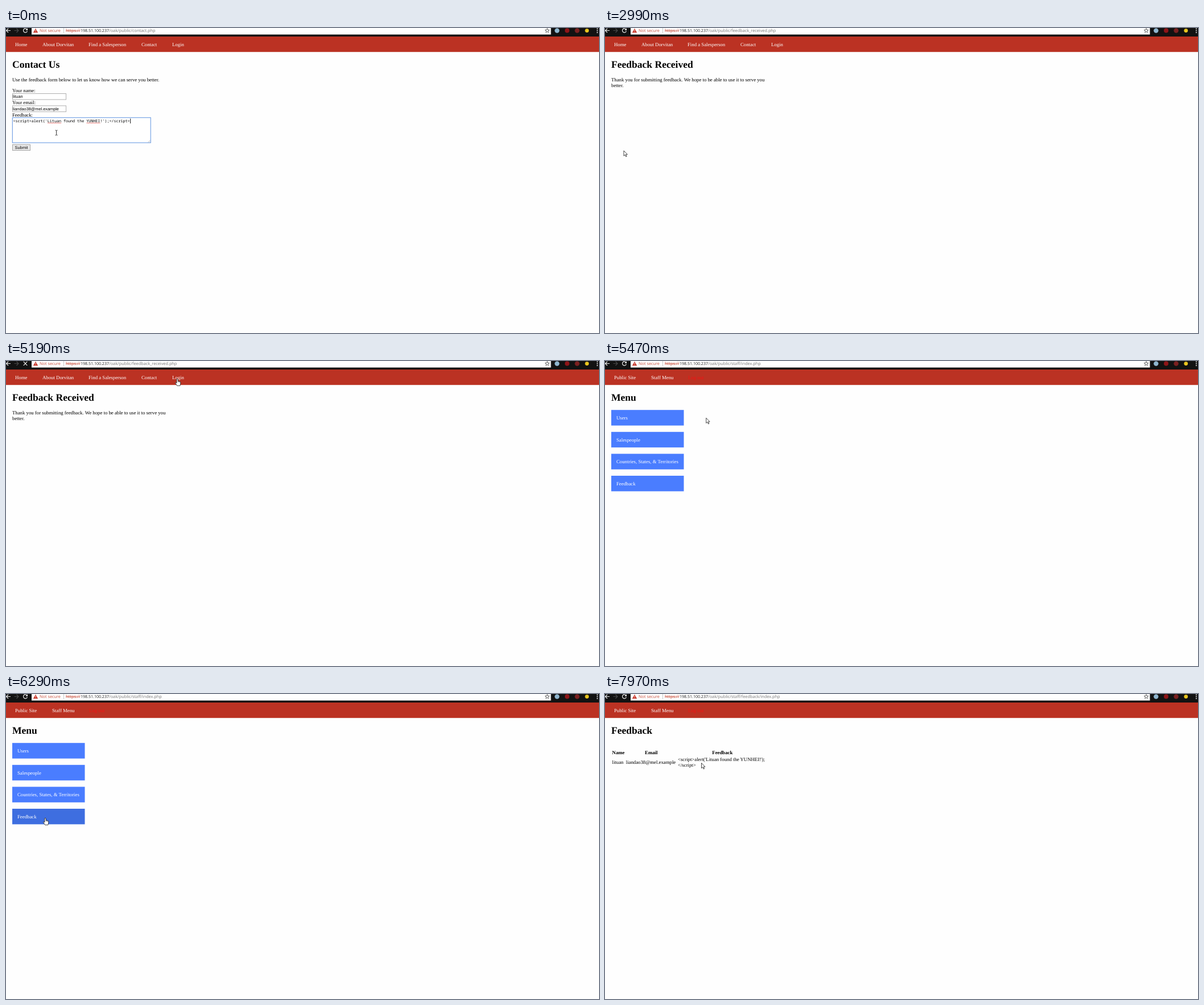
These frames come from a looping animation (1042 by 537 pixels, 8 s). An HTML page with a canvas:

```html
<!DOCTYPE html>
<html lang="en">
<head>
<meta charset="utf-8">
<title>Feedback form</title>
<style>
html, body { margin: 0; width: 100%; height: 100%; overflow: hidden; background: #fefefe; }
canvas { display: block; }
</style>
</head>
<body>
<canvas id="stage" width="1042" height="537"></canvas>
<script>
const ctx = document.getElementById('stage').getContext('2d');
const LOOP = 8000;
const SERIF = '"Liberation Serif", "Times New Roman", serif';
const SANS = '"Liberation Sans", Arial, sans-serif';
const UI = '"Open Sans", "Noto Sans", sans-serif';
const MONO = '"Noto Sans Mono", "DejaVu Sans Mono", monospace';
const BODY = '8.76px ' + SERIF, BOLD = 'bold 8.76px ' + SERIF;
const HEAD = 'bold 17.56px ' + SERIF, FIELD = '7.35px ' + SANS;

const NAME = 'lituan', EMAIL = 'liandao38@mel.example';
const OPEN = "<script>alert('Lituan found the YUNHEI!');", CLOSE = '<' + '/script>';

const ARROW = new Path2D('M0 0V9.2L2.1 7.2L3.7 10.6L5.1 10L3.6 6.7H6.4Z');
const HAND = new Path2D('M-1.1 1Q0 -.6 1.1 1V4.4L4.5 5.2Q6 5.6 5.8 7.5L4.9 12.6H-.4L-3.2 8.2Q-3.5 6.4 -2.2 7L-1.1 8Z');

// Pointer trips: start, end, number of steps, then a quadratic curve
const trips = [
  [130, 280, 2, [88.5, 184.3], [88.5, 184.7], [88.5, 185]],
  [550, 1480, 8, [88.5, 185], [64, 206], [29.5, 214]],
  [2470, 2990, 4, [29.5, 214], [31, 215], [33, 216]],
  [3270, 3700, 4, [33, 216], [130, 138], [236, 61]],
  [3980, 4920, 8, [236, 61], [-48, 60], [301, 31]],
  [5320, 5750, 4, [301, 31], [170, 90], [70, 190]],
  [5900, 6140, 3, [70, 190], [71, 240], [71, 220]],
  [6290, 6290, 1, [71, 220], [70, 219], [69, 218]],
  [7280, 7970, 6, [69, 218], [160, 79], [169.5, 121.5]]
];

const pages = [
  { from: 0, path: 'contact.php', draw: contact },
  { from: 2820, path: 'feedback_received.php', draw: received },
  { from: 5450, path: 'staff/index.php', draw: menu, staff: true },
  { from: 7010, path: 'staff/feedback/index.php', draw: feedback, staff: true }
];
const loads = [[2470, 2990], [5190, 5450], [6730, 7010]];
const publicNav = [['Home', 16], ['About Dorvitan', 64], ['Find a Salesperson', 145], ['Contact', 238], ['Login', 292]];
const staffNav = [['Public Site', 16], ['Staff Menu', 81], ['Log out', 146, '#f51313']];
const menuItems = ['Users', 'Salespeople', 'Countries, States, & Territories', 'Feedback'];
const itemY = i => 86.2 + i * 38.6;

function text(s, x, y, font = BODY, color = '#000', align = 'left') {
  ctx.font = font;
  ctx.fillStyle = color;
  ctx.textAlign = align;
  ctx.fillText(s, x, y);
}

function rect(x, y, w, h, color) {
  ctx.fillStyle = color;
  ctx.fillRect(x, y, w, h);
}

function box(x, y, w, h, fill, edge) {
  rect(x, y, w, h, fill);
  ctx.lineWidth = 1;
  ctx.strokeStyle = edge;
  ctx.strokeRect(x + .5, y + .5, w - 1, h - 1);
}

function line(d, color, width = 1) {
  ctx.strokeStyle = color;
  ctx.lineWidth = width;
  ctx.stroke(new Path2D(d));
}

function dot(x, y, r, color) {
  ctx.fillStyle = color;
  ctx.beginPath();
  ctx.arc(x, y, r, 0, 7);
  ctx.fill();
}

function pointer(t) {
  const trip = trips.filter(s => t >= s[0]).pop();
  if (!trip) return trips[0][3];
  const [t0, t1, n, a, b, c] = trip;
  const k = n > 1 ? Math.min(n, 1 + Math.floor((t - t0) * (n - 1) / (t1 - t0) + 1e-6)) : 1;
  const s = k / n, r = 1 - s;
  return a.map((v, i) => r * r * v + 2 * r * s * b[i] + s * s * c[i]);
}

function star(x, y) {
  ctx.beginPath();
  for (let i = 0; i < 10; i++) {
    const r = i % 2 ? 1.7 : 4, a = i * Math.PI / 5 - Math.PI / 2;
    ctx.lineTo(x + r * Math.cos(a), y + r * Math.sin(a));
  }
  ctx.closePath();
  ctx.strokeStyle = '#444';
  ctx.lineWidth = .8;
  ctx.stroke();
}

function toolbar(path, loading) {
  rect(0, 0, 1042, 15, '#121212');
  rect(45, 0, 912.5, 11.5, '#fefefe');
  line('M8 4.5H.8M4 1L.5 4.5L4 8', '#eee', 1.2);
  line('M14.5 4.5H21.5M18.5 1L22 4.5L18.5 8', '#484848', 1.2);
  if (loading) {
    line('M30.8 1.2L37.2 7.8M37.2 1.2L30.8 7.8', '#eee', 1.2);
  } else {
    line('M37 2.6A3.5 3.5 0 1 0 37.4 5.4', '#eee', 1.2);
    ctx.fillStyle = '#eee';
    ctx.fill(new Path2D('M38 .4V4H34.4Z'));
  }
  ctx.fillStyle = '#c8372b';
  ctx.fill(new Path2D('M52 .8L56.2 8.2H47.8Z'));
  line('M52 3V5.6M52 6.4V7.2', '#fff', .8);
  text('Not secure', 59, 7.3, '7.32px ' + UI, '#c9513f');
  rect(101, 0, .8, 9.5, '#bbb');
  text('https://', 105, 7.3, '7.5px ' + UI, '#c9513f');
  line('M105 4.9H130.5', '#c9513f', .7);
  text('198.51.100.237', 131, 7.3, '7.05px ' + UI, '#222');
  text('/oak/public/' + path, 181, 7.3, '7.32px ' + UI, '#777');
  star(951, 4.7);
  dot(968.3, 4.6, 4.2, '#8fb6cf');
  dot(986, 4.6, 4, '#8d1518');
  dot(1003.6, 4.6, 4.2, '#7b2020');
  dot(1020.8, 4.6, 3.4, '#e9c51f');
  for (const y of [1.6, 4.8, 8]) dot(1039, y, 1, '#eee');
}

function navbar(items) {
  rect(0, 15, 1042, 27.2, '#bb3223');
  for (const [label, x, color] of items) text(label, x, 32, BODY, color || '#fff');
}

function squiggle(x0, x1, y) {
  ctx.beginPath();
  for (let x = x0; x <= x1; x += .5) ctx.lineTo(x, y + .45 * Math.sin(x * 2.6));
  ctx.strokeStyle = '#e0403a';
  ctx.lineWidth = .8;
  ctx.stroke();
}

function contact(t, x, y) {
  const clicked = t >= 2040;
  text('Contact Us', 11, 70, HEAD);
  text('Use the feedback form below to let us know how we can serve you better.', 11, 94);
  text('Your name:', 11, 113);
  box(11, 115, 95, 11.5, '#fff', '#b0b0b0');
  text(NAME, 12, 123, FIELD);
  text('Your email:', 11, 134.4);
  box(11, 136.4, 95, 11.5, '#fff', '#b0b0b0');
  text(EMAIL, 12, 144.5, FIELD);
  text('Feedback:', 11, 155.8);
  box(10.8, 157.3, 243.9, 45.2, '#fff', clicked ? '#b0b0b0' : '#5d92e0');
  text(OPEN + CLOSE, 12.5, 166, '6.71px ' + MONO);
  squiggle(73, 97, 167.3);
  squiggle(141.5, 165.7, 167.3);
  line('M249.5 201.5L253.5 197.5M252 201.5L253.5 200', '#999', .6);
  if (t < 550 || (t >= 1080 && t < 1480)) rect(218.2, 159.5, .9, 8.5, '#000');
  const over = x < 43 && y > 205;
  box(11, 204.8, 32, 11.2, clicked ? '#dcdcdc' : '#e9e9e9', clicked ? '#7fa3d6' : over ? '#929292' : '#a6a6a6');
  text('Submit', 27, 213, '7.4px ' + SANS, '#000', 'center');
}

function received() {
  text('Feedback Received', 11, 70, HEAD);
  text('Thank you for submitting feedback. We hope to be able to use it to serve you', 11, 94);
  text('better.', 11, 104);
}

function overItem(i, x, y) {
  return x > 11 && x < 138.5 && y >= itemY(i) && y <= itemY(i) + 27.4;
}

function menu(t, x, y) {
  text('Menu', 11, 70, HEAD);
  menuItems.forEach((label, i) => {
    rect(11, itemY(i), 127.5, 27.4, overItem(i, x, y) ? '#3e6ee0' : '#4a7dff');
    text(label, 20, itemY(i) + 16.7, BODY, '#fff');
  });
}

function feedback() {
  text('Feedback', 11, 70, HEAD);
  text('Name', 23.5, 105.8, BOLD, '#000', 'center');
  text('Email', 81.3, 105.8, BOLD, '#000', 'center');
  text('Feedback', 206.3, 105.8, BOLD, '#000', 'center');
  text(NAME, 12.5, 122.8);
  text(EMAIL, 36.7, 122.8);
  text(OPEN, 128, 117.8);
  text(CLOSE, 128, 127.8);
}

function cursor(t, page, x, y) {
  ctx.save();
  ctx.translate(x, y);
  const onLink = page.staff
    ? menuItems.some((_, i) => overItem(i, x, y)) && t < 7280
    : y < 36;
  if (page.draw === contact && y < 202) {
    line('M-2 -4.2H-.6L0 -3.6L.6 -4.2H2M0 -3.6V3.8M-2 4.4H-.6L0 3.8L.6 4.4H2', '#222', .9);
  } else {
    const shape = onLink ? HAND : ARROW;
    ctx.fillStyle = '#fff';
    ctx.fill(shape);
    ctx.strokeStyle = '#1a1a1a';
    ctx.lineWidth = .8;
    ctx.lineJoin = 'round';
    ctx.stroke(shape);
    if (onLink) line('M1.1 4.5V6.6M2.8 5V6.8M4.4 5.4V7', '#333', .5);
  }
  ctx.restore();
}

function frame(now) {
  const t = now % LOOP;
  const page = pages.filter(p => t >= p.from).pop();
  const [x, y] = pointer(t);
  ctx.textRendering = 'geometricPrecision';
  rect(0, 0, 1042, 537, '#fefefe');
  toolbar(page.path, loads.some(([a, b]) => t >= a && t < b));
  navbar(page.staff ? staffNav : publicNav);
  page.draw(t, x, y);
  cursor(t, page, x, y);
  requestAnimationFrame(frame);
}
requestAnimationFrame(frame);
</script>
</body>
</html>
```
